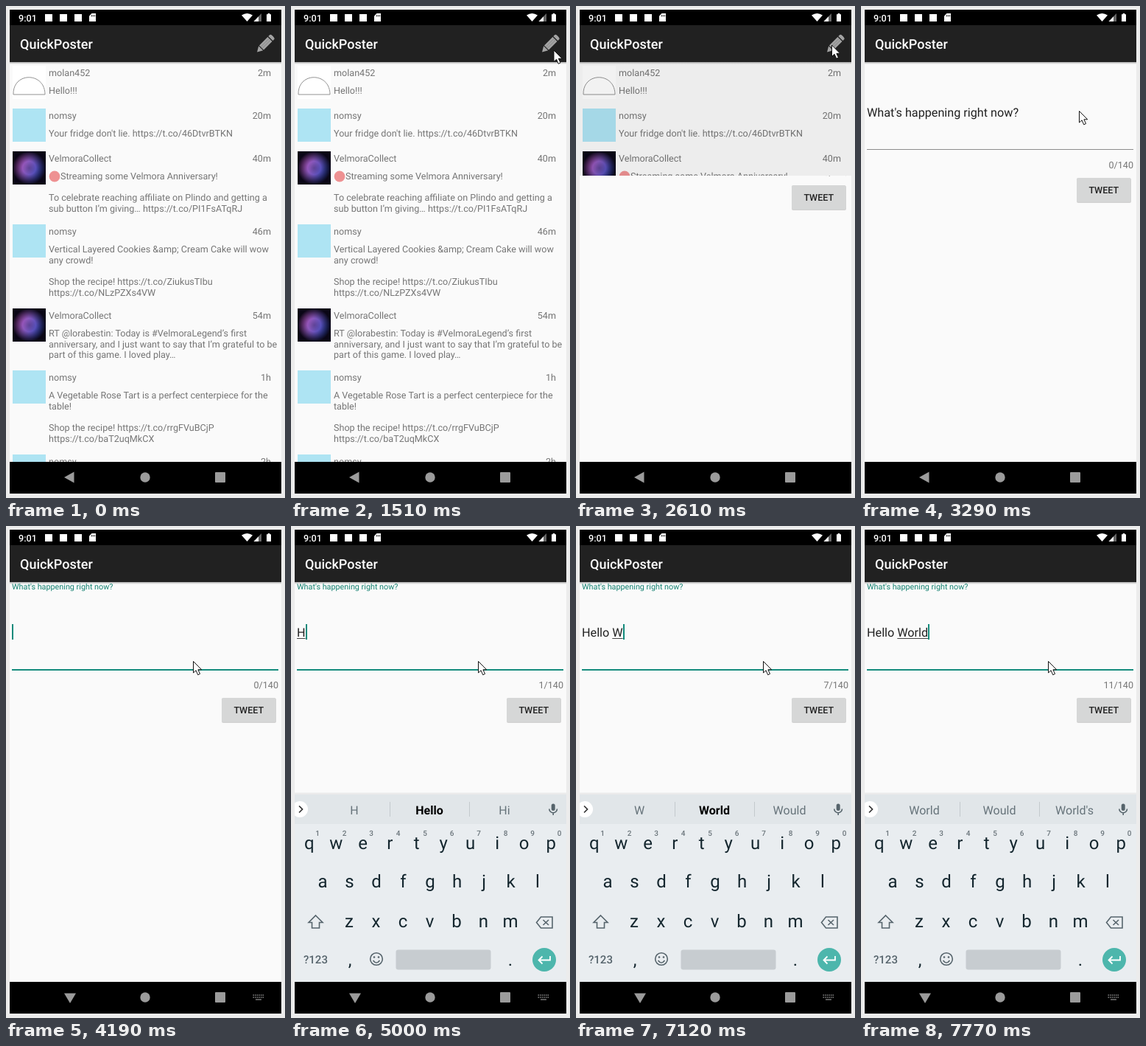
Recreate the animation shown at these times as an HTML page. Size 379 by 667 pixels, loop 8000 ms.

```html
<!DOCTYPE html>
<html lang="en">
<head>
<meta charset="utf-8">
<title>Posting app</title>
<style>
html, body { margin: 0; width: 100%; height: 100%; overflow: hidden; background: #ececec; }
svg { display: block; width: 100vw; height: 100vh; font-family: Roboto, "Noto Sans", sans-serif; }
text { white-space: pre; text-rendering: geometricPrecision; }
.body { font-size: 12.6px; fill: #757575; }
.med { font-weight: 500; }
.end { text-anchor: end; }
.mid { text-anchor: middle; }
.key { font-size: 24px; fill: #14262e; text-anchor: middle; }
.digit { font-size: 10px; font-weight: 500; fill: #6b757b; text-anchor: middle; }
.sug { font-size: 16px; fill: #66737a; text-anchor: middle; }
.sug.bold { font-weight: 700; fill: #000; }
.icon { fill: none; stroke: #56646c; stroke-width: 1.6; }
</style>
</head>
<body>
<svg viewBox="0 0 379 667" preserveAspectRatio="none">
  <defs>
    <clipPath id="content"><rect x="5" y="26" width="369" height="592"/></clipPath>
    <clipPath id="reveal"><rect id="revealBox" x="5" y="26" width="369" height="592"/></clipPath>
    <linearGradient id="shade" x1="0" y1="0" x2="0" y2="1">
      <stop offset="0" stop-opacity=".3"/><stop offset="1" stop-opacity="0"/>
    </linearGradient>
    <linearGradient id="tint" x2="1" y2=".4">
      <stop offset="0" stop-color="#d84cb4"/><stop offset=".5" stop-color="#9a62d0"/>
      <stop offset="1" stop-color="#3450c8"/>
    </linearGradient>
    <radialGradient id="vignette">
      <stop offset="0" stop-color="#0a0616" stop-opacity=".3"/>
      <stop offset=".4" stop-color="#0a0616" stop-opacity=".1"/>
      <stop offset="1" stop-color="#0a0616"/>
    </radialGradient>
    <g id="bar">
      <rect x="5" y="76" width="369" height="3" fill="url(#shade)"/>
      <rect x="5" y="26" width="369" height="50" fill="#212121"/>
      <text class="med" x="19" y="58" font-size="18" fill="#fff">QuickPoster</text>
    </g>
  </defs>

  <rect width="379" height="667" fill="#ececec"/>
  <rect x="5" y="5" width="369" height="656"/>

  <g clip-path="url(#content)">
    <rect x="5" y="26" width="369" height="592" fill="#fafafa"/>
    <g id="feed"></g>
    <rect id="dim" x="5" y="76" width="369" height="542"/>
    <use href="#bar"/>
    <circle id="ripple" cx="351" cy="51" r="17" fill="#fff" opacity=".14"/>
    <g transform="translate(352 51.5) rotate(45)" fill="#a3a3a3">
      <path d="M-4.3-13Q-4.3-15 0-15T4.3-13V-10.5H-4.3ZM-4.3-9.2H4.3V7H-4.3ZM-4.3 8.2H4.3L0 15.5Z"/>
      <path d="M-1.4-9V7M1.4-9V7" stroke="#7c7c7c" stroke-width=".7"/>
    </g>
  </g>

  <g id="compose" clip-path="url(#reveal)">
    <g id="sheet">
      <rect x="5" y="26" width="369" height="620" fill="#fafafa"/>
      <use href="#bar"/>
      <text id="hint" x="8">What's happening right now?</text>
      <rect id="line" x="8" y="194" width="362"/>
      <text id="typed" x="8" y="150" font-size="16.2" fill="#212121"></text>
      <rect id="under" y="152" height="1" fill="#444"/>
      <rect id="caret" y="133" width="2" height="21" fill="#128a7b"/>
      <text id="count" class="body end" x="370" y="219.5"></text>
      <rect x="293" y="233.5" width="74" height="33.5" rx="2" opacity=".16"/>
      <rect x="293" y="233" width="73.5" height="32.5" rx="2" fill="#d6d7d7"/>
      <text class="med mid" x="329.8" y="254" font-size="12.6" fill="#212121">TWEET</text>
    </g>
  </g>

  <g clip-path="url(#content)"><g id="board">
    <rect x="5" y="361.5" width="369" height="3" opacity=".06"/>
    <rect x="5" y="364" width="369" height="254" fill="#e9edf0"/>
    <rect x="5" y="364" width="369" height="40" fill="#e1e6e9"/>
    <path d="M134.5 374V394M242.5 374V394" stroke="#c3c9cd"/>
    <circle cx="12" cy="384" r="11" fill="#fff"/>
    <path d="M11 379.5L15.5 384L11 388.5" fill="none" stroke="#333" stroke-width="1.7"/>
    <rect x="353.7" y="376.5" width="5" height="9.5" rx="2.5" fill="#56646c"/>
    <path class="icon" d="M350.8 383.5A5.3 5.3 0 0 0 361.5 383.5M356.2 388.5V392"/>
    <g id="keys"></g>
    <path class="icon" d="M33.5 528L43 537.5H38.5V545H28.5V537.5H24Z"/>
    <path class="icon" d="M339.5 530H355V545H339.5L333.5 537.5ZM342.5 534L350 541M350 534L342.5 541"/>
    <text class="med mid" x="33.5" y="593" font-size="15" fill="#56646c">?123</text>
    <circle class="icon" cx="116" cy="587" r="8.3"/>
    <path class="icon" d="M111.5 589Q116 595 120.5 589"/>
    <g fill="#56646c"><circle cx="113" cy="584.5" r="1.3"/><circle cx="119" cy="584.5" r="1.3"/></g>
    <rect x="142.5" y="574.5" width="129" height="27" rx="3" fill="#c7ccd0"/>
    <circle cx="344" cy="588" r="16" fill="#4db6ac"/>
    <path d="M352 583V588.5H337M341.5 583.5L336.5 588.5L341.5 593.5" fill="none" stroke="#fff" stroke-width="1.8"/>
  </g></g>

  <g fill="#fff">
    <text class="med" x="17" y="20.5" font-size="12.6">9:01</text>
    <rect x="53" y="11" width="10" height="10"/>
    <rect x="73" y="11" width="10" height="10"/>
    <rect x="93" y="11" width="10" height="10"/>
    <path d="M116.5 10H122V21H113V13.5Z"/>
    <path d="M116.5 12V14.5M118.5 12V14.5M120.5 12V14.5" stroke="#000" stroke-width=".8"/>
    <path d="M320 12.5Q327.5 7.5 335 12.5L327.5 21Z"/>
    <path d="M347 10V21H336.5Z" fill="#666"/>
    <path d="M343 14.2V21H336.5Z"/>
    <path d="M354 11.3H355.7V10H358.3V11.3H360V21H354Z"/>
  </g>

  <g fill="#9b9b9b">
    <path id="back"/>
    <circle cx="189" cy="639" r="6.7"/>
    <rect x="284" y="632" width="14" height="14" rx="1"/>
    <g id="switcher" fill="none" stroke="#8a8a8a">
      <path d="M335.5 636H350M335.5 639H350" stroke-width="1.5" stroke-dasharray="1.5 1.1"/>
      <path d="M339 642H347" stroke-width="1.3"/>
    </g>
  </g>

  <path id="pointer" d="M0 0V15.5L3.6 12.3L6.2 18.3L9 17L6.4 11.3H11.2Z" fill="#fff" stroke="#111"/>
</svg>

<script>
const LOOP = 8000;
const $ = id => document.getElementById(id);

function add(parent, tag, attrs, text = "") {
  const el = document.createElementNS("http://www.w3.org/2000/svg", tag);
  set(el, attrs);
  el.textContent = text;
  parent.append(el);
  return el;
}
function set(el, attrs) {
  for (const name in attrs) el.setAttribute(name, attrs[name]);
}
const show = (el, on) => set(el, { visibility: on ? "visible" : "hidden" });

// Value of the last step that has begun by time t
function at(steps, t) {
  let value = null;
  for (const [start, ...rest] of steps) if (start <= t) value = rest;
  return value;
}

const posts = [
  [81, "doodle", "molan452", "2m", ["Hello!!!"]],
  [139, "food", "nomsy", "20m", ["Your fridge don't lie. https://t.co/46DtvrBTKN"]],
  [197, "nebula", "VelmoraCollect", "40m", ["Streaming some Velmora Anniversary!", "",
    "To celebrate reaching affiliate on Plindo and getting a",
    "sub button I’m giving… https://t.co/PI1FsATqRJ"]],
  [296, "food", "nomsy", "46m", ["Vertical Layered Cookies &amp; Cream Cake will wow", "any crowd!", "",
    "Shop the recipe! https://t.co/ZiukusTIbu", "https://t.co/NLzPZXs4VW"]],
  [410, "nebula", "VelmoraCollect", "54m", ["RT @lorabestin: Today is #VelmoraLegend’s first",
    "anniversary, and I just want to say that I’m grateful to be",
    "part of this game. I loved play…"]],
  [494, "food", "nomsy", "1h", ["A Vegetable Rose Tart is a perfect centerpiece for the", "table!", "",
    "Shop the recipe! https://t.co/rrgFVuBCjP", "https://t.co/baT2uqMkCX"]],
  [608, "food", "nomsy", "2h", []]
];

function buildFeed() {
  const feed = $("feed");
  for (const [y, kind, name, age, lines] of posts) {
    const box = fill => add(feed, "rect", { x: 9, y, width: 45, height: 45, fill });
    if (kind === "food") box("#aee4f3");
    if (kind === "nebula") { box("url(#tint)"); box("url(#vignette)"); }
    if (kind === "doodle") {
      box("#fff");
      add(feed, "path", {
        d: `M10 ${y + 39}C9 ${y + 8} 53 ${y + 8} 53 ${y + 39}Z`, fill: "#fff", stroke: "#929292"
      });
    }
    add(feed, "text", { class: "body", x: 58, y: y + 13.5 }, name);
    add(feed, "text", { class: "body end", x: 360, y: y + 13.5 }, age);
    lines.forEach((line, i) => {
      const dot = line.startsWith("Streaming");
      if (dot) add(feed, "circle", { cx: 66, cy: y + 34, r: 7.4, fill: "#ee9192" });
      add(feed, "text", { class: "body", x: dot ? 74 : 58, y: y + 38 + i * 14.7 }, line);
    });
  }
}

function buildKeys() {
  const rows = [["qwertyuiop", 24.7, 438], ["asdfghjkl", 43, 490], ["zxcvbnm", 79, 543.5]];
  for (const [letters, x, y] of rows)
    [...letters].forEach((c, i) => add($("keys"), "text", { class: "key", x: x + i * 36.5, y }, c));
  for (let i = 0; i < 10; i++)
    add($("keys"), "text", { class: "digit", x: 36 + i * 36.5, y: 420 }, (i + 1) % 10);
  add($("keys"), "text", { class: "key", x: 80, y: 596 }, ",");
  add($("keys"), "text", { class: "key", x: 298, y: 596 }, ".");
  return [86, 188, 290].map(x => add($("board"), "text", { class: "sug", x, y: 390.5 }));
}

const pointerSteps = [
  [1360, 372, 69], [1510, 357, 60], [1630, 347.5, 53], [2910, 347.5, 57], [3050, 340, 78],
  [3170, 319, 113], [3290, 296.5, 142.5], [3410, 270, 170], [3530, 254.5, 183.5]
];
const dimSteps = [[0, 0], [2340, .01], [2460, .02], [2610, .05], [2760, .08]];
// Top of the revealed area and the sheet's remaining offset
const revealSteps = [[2610, 230, 10], [2760, 40, 2], [2910, 26, 0]];
const boardSteps = [[4340, 110], [4460, 0]];

// Finished text, word in progress, suggestions, whether the middle one is bold
const typing = [
  [0, "", "", "I The Hi"],
  [5000, "", "H", "H Hello Hi", true],
  [5120, "", "He", "He Hello Hey", true],
  [5240, "", "Hel", "Hel Hello Help", true],
  [5520, "", "Helo", "Helo Hello Help", true],
  [6050, "", "Hel", "Hel Hello Help", true],
  [6290, "", "Hell", "Hell Hello Help", true],
  [6410, "", "Hello", "Hello Hell Help"],
  [6660, "Hello\u00a0", "", "I there and"],
  [7120, "Hello\u00a0", "W", "W World Would", true],
  [7370, "Hello\u00a0", "Wo", "Wo World Would", true],
  [7520, "Hello\u00a0", "Wor", "Wor World Work", true],
  [7770, "Hello\u00a0", "World", "World Would World's"]
];

buildFeed();
const sugs = buildKeys();

function drawField(t) {
  const focus = t >= 3920;
  const lift = t < 4060 ? 0 : t < 4190 ? .6 : 1;
  set($("hint"), {
    y: 149.5 - 63.5 * lift, "font-size": 16.2 - 5.4 * lift, fill: focus ? "#168272" : "#212121"
  });
  set($("line"), { height: focus ? 2 : 1, fill: focus ? "#168c7d" : "#8c8c8c" });

  const [done, word, words, bold] = at(typing, t);
  const text = done + word, typed = $("typed");
  typed.textContent = text;
  const width = text ? typed.getComputedTextLength() : 0;
  const start = done ? typed.getSubStringLength(0, done.length) : 0;
  set($("under"), { x: 8 + start, width: word ? width - start : 0 });
  set($("caret"), { x: Math.round(8 + width) });
  show($("caret"), focus && !(t >= 4460 && t < 5000));
  $("count").textContent = text.length + "/140";
  words.split(" ").forEach((s, i) => {
    sugs[i].textContent = s;
    set(sugs[i], { class: bold && i === 1 ? "sug bold" : "sug" });
  });
}

function draw(t) {
  const pos = at(pointerSteps, t);
  show($("pointer"), pos);
  if (pos) set($("pointer"), { transform: `translate(${pos})` });

  set($("dim"), { opacity: at(dimSteps, t)[0] });
  show($("ripple"), t >= 2190 && t < 2340);

  const reveal = at(revealSteps, t);
  set($("compose"), { display: reveal ? "inline" : "none" });
  if (reveal) {
    set($("revealBox"), { y: reveal[0], height: 618 - reveal[0] });
    set($("sheet"), { transform: `translate(0 ${reveal[1]})` });
    drawField(t);
  }

  const board = at(boardSteps, t);
  set($("board"), { display: board ? "inline" : "none" });
  if (board) set($("board"), { transform: `translate(0 ${board[0]})` });

  const keyboardNav = t >= 4190;
  set($("back"), { d: keyboardNav ? "M79 633.5H95L87 647Z" : "M92.5 631.5V646.5L79 639Z" });
  show($("switcher"), keyboardNav);
}

function tick() {
  draw(performance.now() % LOOP);
  requestAnimationFrame(tick);
}
tick();
</script>
</body>
</html>
```
